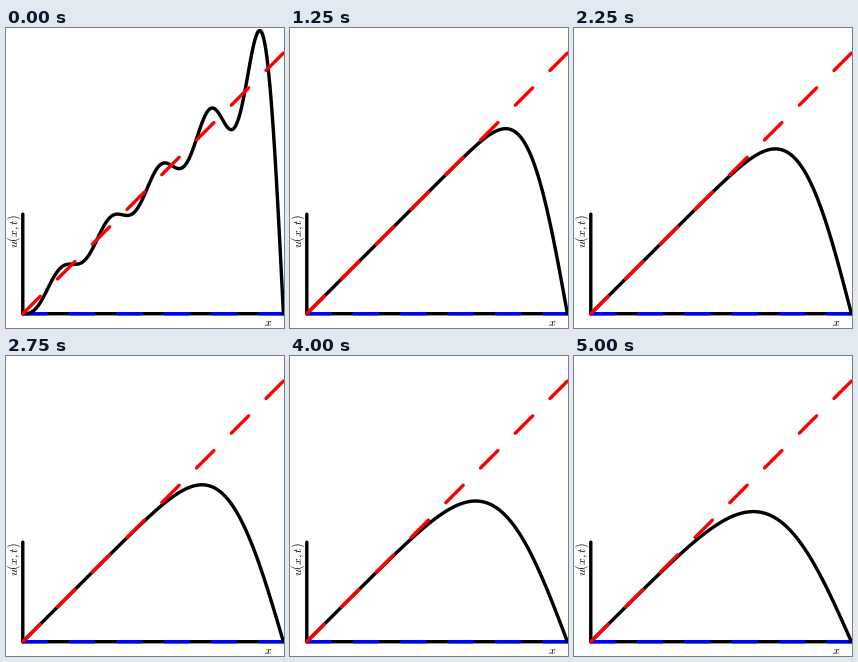
A matplotlib script for the animation above (5250 ms loop, 278 px wide and 300 px high).

```python
import numpy as np
import matplotlib.pyplot as plt
from matplotlib.animation import FuncAnimation

W, H, DPI = 278, 300, 64
PX = 72 / DPI                      # points per pixel
X0, Y0, L = 16.8, 285.7, 260.6     # origin and side length of the plot
MODES, FRAMES, STEP = 10, 21, 0.0015

plt.rcParams["mathtext.fontset"] = "cm"
plt.rcParams["path.simplify"] = False

fig = plt.figure(figsize=(W / DPI, H / DPI), dpi=DPI, facecolor="white")
ax = fig.add_axes([0, 0, 1, 1])
ax.set_xlim(0, W)
ax.set_ylim(H, 0)
ax.axis("off")


def stroke(x, y, color, z):
    line, = ax.plot(x, y, color=color, lw=3.4 * PX, zorder=z, snap=False,
                    solid_capstyle="round", solid_joinstyle="round")
    return line


def dashes(count, slope, color, z):
    """Dashes and gaps of equal length, with a dash at either end."""
    edges = np.linspace(0, L, 2 * count)
    for a, b in edges.reshape(-1, 2):
        stroke([X0 + a, X0 + b], [Y0 - slope * a, Y0 - slope * b], color, z)


def label(x, y, text, angle=0):
    ax.text(x, y, text, size=12 * PX, rotation=angle, rotation_mode="anchor",
            ha="left", va="baseline", color="black")


s = np.linspace(0, 1, 521)
n = np.arange(1, MODES + 1)[:, None]
basis = 2 / np.pi * (-1.0) ** (n + 1) / n * np.sin(n * np.pi * s)


def heat(t):
    """Truncated sine series of u(x, 0) = x with both ends held at zero."""
    return (basis * np.exp(-(n * np.pi) ** 2 * t)).sum(axis=0)


stroke([X0, X0], [Y0, 186.2], "black", 1)
stroke([X0, X0 + L], [Y0, Y0], "black", 1)
dashes(6, 0, "#0000ff", 2)
curve = stroke(X0 + L * s, Y0 - L * heat(0), "black", 3)
dashes(8, 1, "#ff0000", 4)
label(12, 220.5, "$u(x,t)$", 90)
label(258, 298, "$x$")


def update(i):
    curve.set_ydata(Y0 - L * heat(i * STEP))
    return curve,


anim = FuncAnimation(fig, update, frames=FRAMES, interval=250,
                     repeat=True, repeat_delay=0)
plt.show()
```
